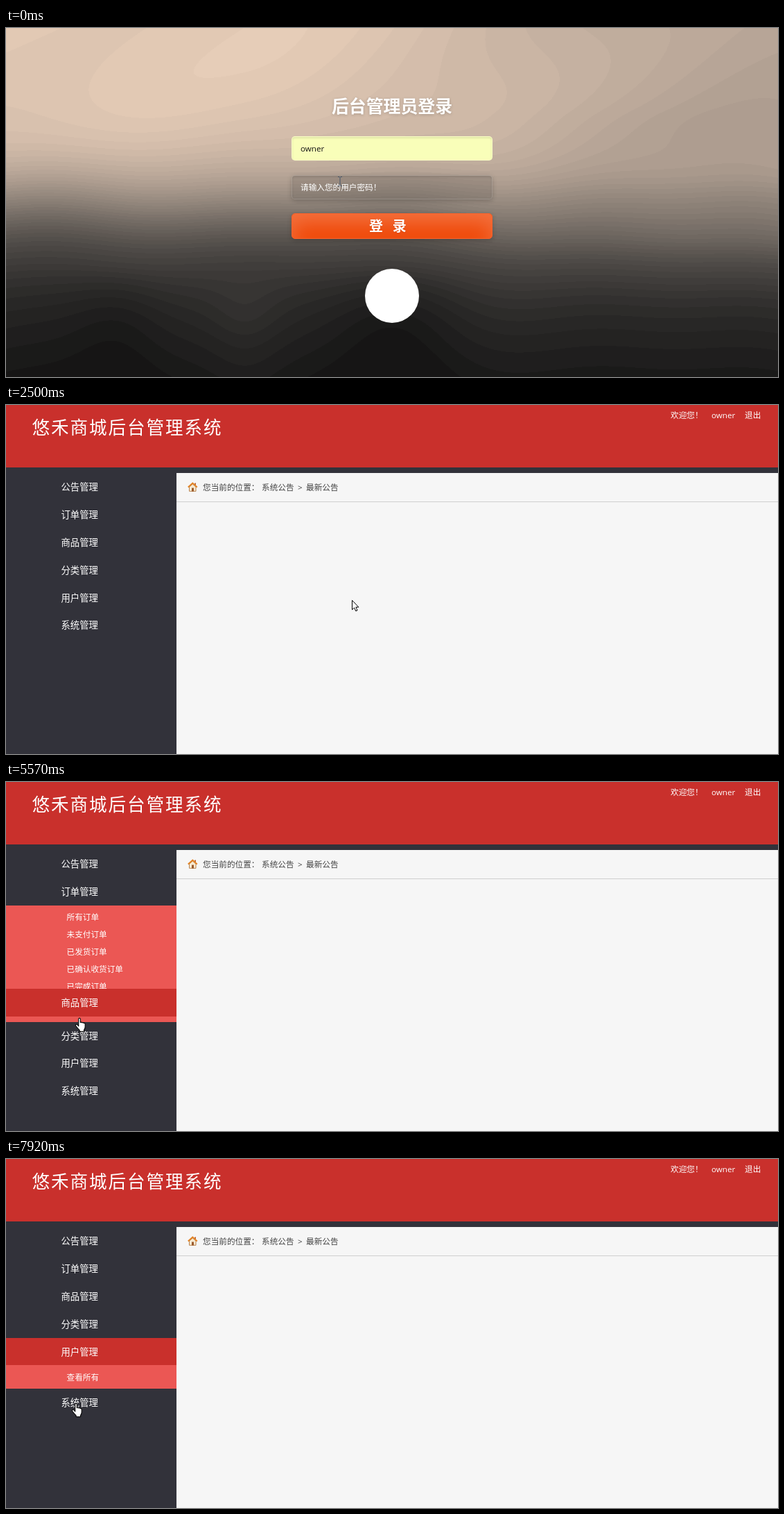
Write an HTML page with a canvas that moves like this. It is 1114 by 503 pixels and loops after 8 s.

```html
<!DOCTYPE html>
<html lang="zh-CN">
<head>
<meta charset="utf-8">
<title>后台管理系统</title>
<style>
html, body { margin: 0; width: 100%; height: 100%; overflow: hidden; }
body { position: relative; background: #fefefe; color: #fff; font: 11.63px "Open Sans", "Noto Sans CJK SC", "Noto Sans CJK", sans-serif; }
section, section > *, #pointer { position: absolute; left: 0; top: 0; box-sizing: border-box; white-space: pre; }
section { width: 1114px; height: 503px; }
#login h1 { left: 412px; top: 92px; width: 290px; margin: 0; font-size: 24.9px; line-height: 40px; text-align: center; text-shadow: 0 1px 4px rgba(0,0,0,.2); }
#login .field { left: 412px; width: 290px; height: 35px; padding-left: 12px; line-height: 34px; border: 1px solid rgba(255,255,255,.15); border-radius: 5px; }
#login #user { top: 156px; color: #111; background: #f9feb9; box-shadow: inset 0 2px 3px rgba(0,0,0,.1); }
#login #password { top: 212px; background: rgba(45,45,45,.15); box-shadow: inset 0 2px 3px rgba(0,0,0,.1), 0 2px 7px rgba(0,0,0,.2); }
#enter { left: 412px; top: 267px; width: 290px; height: 37px; padding-left: 111px; border: 1px solid #f9622a; border-radius: 5px; background: #ef4300; font-size: 20px; font-weight: 700; line-height: 36px; word-spacing: 8.5px; text-shadow: 0 1px 2px rgba(0,0,0,.1); box-shadow: inset 0 15px 30px rgba(255,255,255,.25), 0 2px 7px rgba(0,0,0,.2); }
#enter.hover { box-shadow: inset 0 15px 30px rgba(255,255,255,.15), 0 2px 7px rgba(0,0,0,.2); }
#enter.pressed { border-color: #ef4300; box-shadow: inset 0 5px 8px rgba(0,0,0,.1), 0 1px 4px rgba(0,0,0,.1); }
#mark { left: 518px; top: 347px; width: 78px; height: 78px; border-radius: 50%; background: #fff; }
#panel { background: #f6f6f6; }
#head { width: 100%; height: 98px; background: #c9302c; border-bottom: 8px solid #32323a; }
#panel h1 { left: 37.5px; top: 13px; margin: 0; font-size: 25.6px; font-weight: 400; line-height: 40px; letter-spacing: 1.9px; }
#panel .top { top: 5px; line-height: 20px; }
#panel .crumb { top: 109px; line-height: 20px; color: #444; }
#rule { left: 246px; top: 139px; width: 100%; height: 1px; background: #d0d0d0; }
#panel #menu { top: 98px; width: 245.6px; height: 405px; padding-top: .4px; background: #32323a; }
.row { height: 39.8px; padding-left: 79.5px; font-size: 13.35px; line-height: 41px; }
.row.on { background: #c9302c; }
.sub { overflow: hidden; background: #eb5754; }
.sub div { height: 24.87px; padding-left: 87.5px; line-height: 26px; }
.sub div:first-child { margin-top: 4.15px; }
#pointer { overflow: visible; }
#pointer path { fill: #fff; stroke: #000; stroke-linejoin: round; }
#pointer #beam { fill: none; stroke: #46566a; }
</style>
</head>
<body>
<section id="login">
  <canvas id="sky" width="1114" height="503"></canvas>
  <h1>后台管理员登录</h1>
  <div id="user" class="field">owner</div>
  <div id="password" class="field"></div>
  <div id="enter">登 录</div>
  <div id="mark"></div>
</section>
<section id="panel">
  <div id="head"></div>
  <h1>悠禾商城后台管理系统</h1>
  <span class="top" style="left:959px">欢迎您！</span>
  <span class="top" style="left:1018px">owner</span>
  <span class="top" style="left:1066px">退出</span>
  <svg style="left:262px;top:111px" width="15" height="15">
    <path d="M2.5 7L7.3 3L12 7V13.3H2.5Z" fill="#f7ead2" stroke="#b98550"/>
    <path d="M6 13.5V8.5H9V13.5Z" fill="#9a5a2c"/>
    <path d="M10.3 1.5H12V4H10.3Z" fill="#b4552c"/>
    <path d="M.8 7.5L7.3 1.6L13.8 7.5" fill="none" stroke="#e28325" stroke-width="2"/>
  </svg>
  <span class="crumb" style="left:284px">您当前的位置：</span>
  <span class="crumb" style="left:369px">系统公告</span>
  <span class="crumb" style="left:421px">&gt;</span>
  <span class="crumb" style="left:433px">最新公告</span>
  <div id="rule"></div>
  <div id="menu"></div>
</section>
<svg id="pointer" width="20" height="22">
  <path id="arrow" d="M.5 .5V14L3.6 11.2L5.8 16L8 15L5.9 10.3H9.8Z"/>
  <path id="hand" transform="translate(-6.6 -.8) scale(1.07)" d="M5 12V2Q6.2 0 7.4 2V7Q8.6 5.8 9.6 7.3Q10.8 6.3 11.8 7.8Q13.2 7 13.8 9V13Q13.6 15.5 12.3 17V19H6.3V17.3Q4 15 1 11Q1.2 8.8 3.4 10Z"/>
  <path id="beam" d="M-3 .5H-1L0 1.5L1 .5H3M0 1.5V12.5M-3 13.5H-1L0 12.5L1 13.5H3"/>
</svg>
<script>
const $ = id => document.getElementById(id);
const clamp = v => Math.max(0, Math.min(1, v));
const smooth = v => (1 - Math.cos(Math.PI * clamp(v))) / 2;

// Blurred dusk landscape in soft contour bands
function paintSky() {
  const { width, height } = $('sky'), g = $('sky').getContext('2d');
  const image = g.createImageData(width, height), bands = 48;
  const bump = (x, centre, radius) => Math.exp(-(((x - centre) / radius) ** 2));
  for (let x = 0, right, wave, lumps; x < width; x++) {
    right = smooth((x - 350) / 760);
    wave = Math.sin(x / 75 + 1) + .6 * Math.sin(x / 41);
    lumps = 55 * bump(x, 160, 65) + 65 * bump(x, 557, 80) - 45 * bump(x, 345, 60);
    for (let y = 0; y < height; y++) {
      const low = smooth((y - 330) / 110), high = 1 - smooth((y - 120) / 150);
      const bent = y + wave * (4 + 5 * low) + lumps * low - 28 * right * smooth((y - 230) / 90);
      const dusk = .05 + .09 * clamp((503 - bent) / 160) + .8 / (1 + Math.exp((bent - 258) / 40));
      const dim = high * (.19 * right + .015 * Math.sin(x / 90 + y / 50));
      const level = Math.round((dusk - dim) * bands) / bands;
      const red = 12 + 228 * level, warmth = level ** 1.5;
      image.data.set([red, red - 27 * warmth, red - 50 * warmth, 255], (y * width + x) * 4);
    }
  }
  g.putImageData(image, 0, 0);
}

const menu = [
  ['公告管理', '发布公告 查看所有公告', 3443],
  ['订单管理', '所有订单 未支付订单 已发货订单 已确认收货订单 已完成订单', 4342],
  ['商品管理', '展示所有 添加商品 下架商品', 5450],
  ['分类管理', '展示所有 添加分类', 6280],
  ['用户管理', '查看所有', 7020],
  ['系统管理', '', Infinity]
].map(([name, links, start]) => {
  const row = document.createElement('div'), sub = document.createElement('div');
  const items = links.split(' ');
  row.className = 'row';
  row.textContent = name;
  sub.className = 'sub';
  sub.innerHTML = items.map(s => `<div>${s}</div>`).join('');
  $('menu').append(row, sub);
  return { row, sub, start, full: items.length * 24.87 + 8.3 };
});

// The picture moves in bursts of even steps: first moment, last moment, steps
const bursts = [[0, 0, 1], [250, 1170, 6], [1760, 1760, 1], [2070, 2070, 1], [2500, 2500, 1],
  [2940, 3960, 8], [4110, 5140, 8], [5570, 6590, 9], [6740, 7770, 8], [7920, 7920, 1]];
function stepped(time) {
  const [from, to, count] = bursts.findLast(b => b[0] <= time);
  const last = count - 1 || 1;
  const step = Math.floor(clamp((time - from) / (to - from || 1)) * last + 1e-6);
  return from + (to - from) * step / last;
}

// Pointer stops: time, x, y
const route = [[610, 482, 214], [1170, 499, 281], [2800, 499, 281], [3520, 133.7, 127], [3960, 133.7, 127],
  [4400, 109, 217], [5570, 106, 340], [6590, 105, 324], [6880, 104.5, 342], [7500, 102, 364], [7920, 101, 352]];
function pointerAt(t) {
  const next = Math.max(1, route.findIndex(stop => stop[0] >= t));
  const [t0, x0, y0] = route[next - 1], [t1, x1, y1] = route[next];
  const k = clamp((t - t0) / (t1 - t0));
  return [x0 + (x1 - x0) * k, y0 + (y1 - y0) * k];
}

function draw(time) {
  const t = stepped(time);
  const show = (id, on) => $(id).style.display = on ? '' : 'none';
  show('login', t < 2070);
  show('panel', t >= 2500);

  const dots = Math.max(0, Math.min(6, Math.ceil((t - 200) / 80)));
  $('password').textContent = dots ? '•'.repeat(dots) : '请输入您的用户密码！';
  $('enter').className = t >= 1760 ? 'pressed' : t >= 1170 ? 'hover' : '';

  menu.forEach(({ row, sub, start, full }, i) => {
    const end = menu[i + 1]?.start ?? Infinity;
    row.classList.toggle('on', t >= start && t < end);
    sub.style.height = full * smooth((t - start) / 600) * (1 - smooth((t - end) / 600)) + 'px';
  });

  const [x, y] = pointerAt(t);
  const kind = t < 2070 ? (y < 248 ? 'beam' : y < 267 ? 'arrow' : 'hand') : x < 246 ? 'hand' : 'arrow';
  for (const id of ['arrow', 'hand', 'beam']) show(id, id === kind);
  $('pointer').style.transform = `translate(${x}px, ${y}px)`;
}

paintSky();
const begin = performance.now();
(function loop() {
  draw((performance.now() - begin) % 8000);
  requestAnimationFrame(loop);
})();
</script>
</body>
</html>
```
